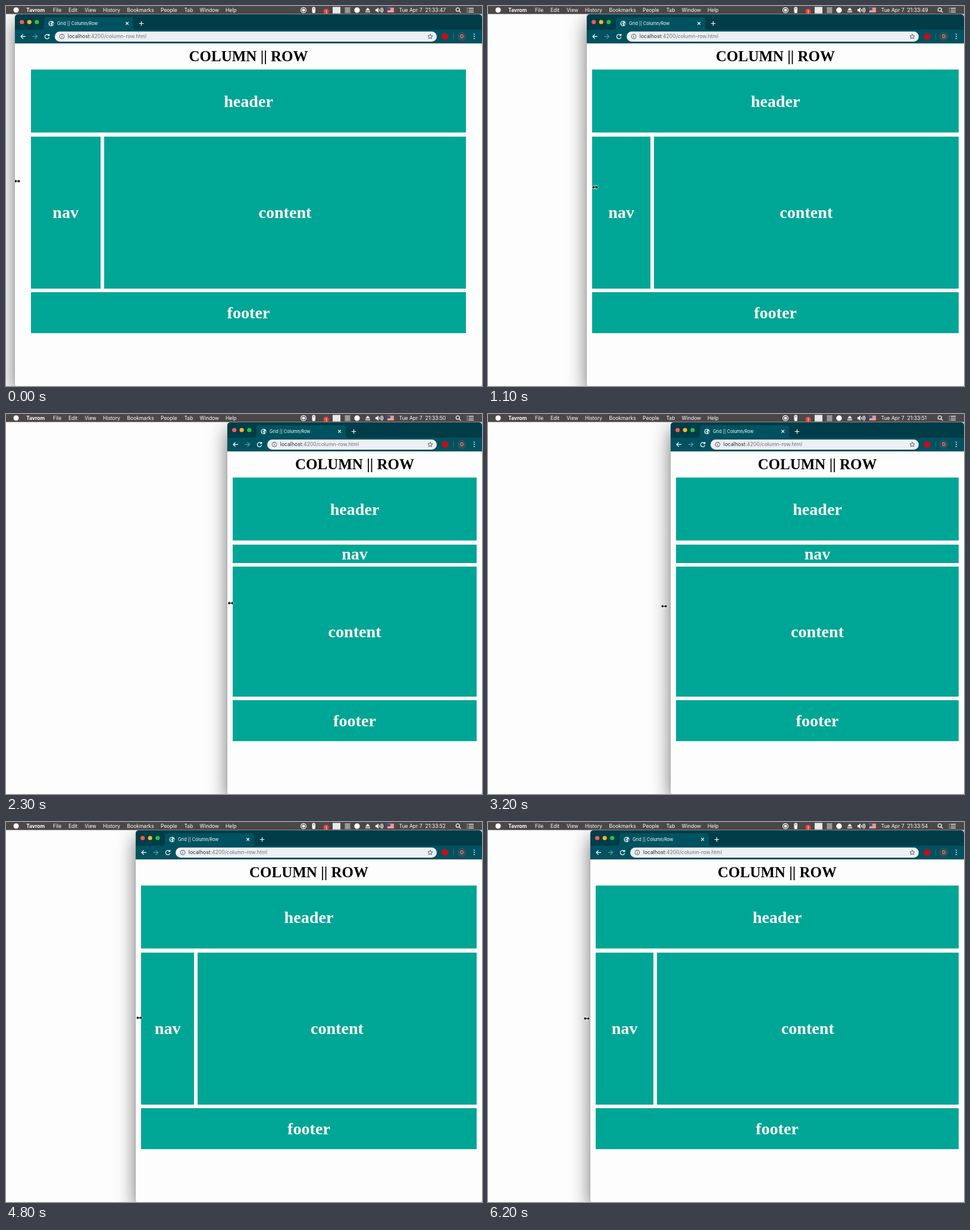
Animation, 800 px wide and 640 px high, one loop 6.3 s. Source, as an HTML page:

```html
<!DOCTYPE html>
<html lang="en">
<head>
<meta charset="utf-8">
<title>Column || Row</title>
<style>
  html, body { margin: 0; width: 800px; height: 640px; overflow: hidden; background: #fefdfe; }
  body { position: relative; }
  #win {
    position: absolute; top: 14px; right: 0; height: 626px; border-radius: 5px 5px 3px 3px; overflow: hidden;
    background: linear-gradient(#003d48 26px, #005260 26px 49px, #fefdfe 49px);
    box-shadow: 0 0 1px rgba(0,0,0,.5), 0 12px 32px rgba(0,0,0,.56);
  }
  #pill { position: absolute; left: 67px; right: 76px; top: 28.5px; height: 17.5px; border-radius: 9px; background: #edf0f5; }
  h1, #grid { font-family: "Liberation Serif", Times, serif; font-weight: bold; text-align: center; }
  h1 { position: absolute; top: 57px; width: 100%; margin: 0; font-size: 25px; line-height: 27px; color: #000; white-space: nowrap; }
  #grid {
    position: absolute; top: 93px; left: 9.375px; right: 9.375px; max-width: 731.25px; margin: auto;
    display: grid; gap: 6.25px; grid-template-columns: repeat(6, minmax(0, 1fr));
    grid-template-rows: 106.25px 31.25px 218.75px 68.75px; font-size: 28.125px; color: #fff;
  }
  #grid div { grid-column: 1 / 7; display: flex; align-items: center; justify-content: center; background: #00a695; line-height: 31px; }
  #grid.wide .nav { grid-area: 2 / 1 / 4 / 2; }
  #grid.wide .content { grid-area: 2 / 2 / 4 / 7; }
  svg { position: absolute; left: 0; top: 0; font-family: Inter, sans-serif; }
  text { white-space: pre; }
  .line { fill: none; stroke: #fff; stroke-width: 1.2; }
</style>
</head>
<body>
<div id="win">
  <div id="pill"></div>
  <h1>COLUMN || ROW</h1>
  <div id="grid">
    <div>header</div>
    <div class="nav">nav</div>
    <div class="content">content</div>
    <div>footer</div>
  </div>
</div>

<svg width="800" height="640" fill="#fff">
  <!-- tab and left side of the toolbar -->
  <g id="left">
    <circle cx="11.7" cy="27" r="3.6" fill="#ff5c54"/>
    <circle cx="24.2" cy="27" r="3.6" fill="#f9b42d"/>
    <circle cx="36.8" cy="27" r="3.6" fill="#27c53d"/>
    <path fill="#005260" d="M45 40q4 0 4-4V23q0-4 4-4H195q4 0 4 4V36q0 4 4 4z"/>
    <circle cx="61" cy="29.5" r="4.6" fill="#dcebed"/>
    <path fill="#2b6d78" d="M57.5 27.5l3-1.5 1.5 2-2.5 1.5 2 1.5-1 2.5-2-2zM62.5 29.5l2.5-1v2.500l-1.500 1.500z"/>
    <text x="71" y="32.200" font-size="7.4">Grid || Column/Row</text>
    <path class="line" stroke-width="1" d="M186.300 27l4.600 4.600m0-4.600l-4.600 4.600"/>
    <path class="line" d="M208.700 29.500h7.600m-3.800-3.800v7.600"/>
    <path class="line" d="M18 51.300h-8m3.700-3.700l-3.700 3.700 3.700 3.700"/>
    <path class="line" opacity=".4" d="M29.500 51.300h8m-3.700-3.700l3.700 3.700-3.700 3.700"/>
    <path class="line" d="M56.800 49a3.700 3.700 0 1 0 .9 3.400M57.600 47v2.800h-2.800"/>
    <g stroke="#50545a" fill="none"><circle cx="79" cy="51.300" r="3.900" stroke-width=".9"/><path d="M79 50.700v2.600M79 48.700v1.100"/></g>
    <text x="88.800" y="54.300" font-size="8.6" fill="#6b6e73"><tspan fill="#26282c">localhost</tspan>:4200/column-row.html</text>
  </g>

  <!-- right side of the toolbar -->
  <path fill="none" stroke="#4d5157" stroke-width=".9" d="M713 47.200l1.200 2.700 2.900.3-2.200 1.900.7 2.900-2.600-1.500-2.600 1.500.7-2.900-2.200-1.900 2.900-.3z"/>
  <circle cx="738" cy="51.300" r="5.600" fill="#c40d1c"/>
  <path fill="#27707c" d="M752 46h1v10h-1z"/>
  <circle cx="766" cy="51.300" r="7.200" fill="#424b53"/>
  <text x="766" y="54" font-size="7.500" text-anchor="middle" fill="#dde1e4">O</text>
  <g fill="#e4eef0"><circle cx="787" cy="47.600" r="1"/><circle cx="787" cy="51.200" r="1"/><circle cx="787" cy="54.800" r="1"/></g>

  <!-- menu bar -->
  <path fill="#4b4749" d="M0 0H800V13.500H0z"/>
  <circle cx="17" cy="6.700" r="4.500"/>
  <g id="menu" font-size="8.500"><text x="34" y="10" font-weight="bold">Tavrom</text></g>
  <circle class="line" cx="500" cy="7" r="4.400"/><circle cx="500" cy="7" r="2.500"/>
  <rect x="514.500" y="1.500" width="5.400" height="10.500" rx="2.500"/><path stroke="#4b4749" d="M517.200 3v3"/>
  <circle cx="538" cy="9" r="4.500" fill="#e8473f"/>
  <text x="538" y="11.500" font-size="6.500" text-anchor="middle">1</text>
  <rect x="549" y="1.500" width="13" height="11" fill="#e9e8e9"/>
  <rect x="569.500" y="2" width="9" height="10" fill="#9a9799"/>
  <circle cx="590" cy="7" r="4.700"/>
  <path d="M608 2.800l4 4.700h-8zM604 9h8v1.500h-8z"/>
  <path d="M621 5.200h2l3-2.700v9l-3-2.700h-2z"/>
  <path class="line" stroke-width=".9" d="M627.800 5q1.600 2 0 4M629.800 3.700q2.800 3.300 0 6.600M631.700 2.600q4 4.400 0 8.800"/>
  <rect x="641" y="2.700" width="11" height="8.300" fill="#f0d9da"/>
  <path stroke="#cf4a50" d="M641 3.200h11M641 5.500h11M641 7.800h11M641 10.200h11"/>
  <rect x="641" y="2.700" width="5" height="4.400" fill="#46568f"/>
  <text id="clock" x="660.500" y="10" font-size="8.600"></text>
  <circle class="line" cx="759.200" cy="6" r="2.900"/><path class="line" d="M761.400 8.200l3 3"/>
  <path class="line" d="M777.500 3.800h8.500M777.500 7h8.500M777.500 10.200h8.500M774.700 3.800h1.300M774.700 7h1.300M774.700 10.200h1.300"/>

  <path id="cursor" fill="#000" stroke="#fff" stroke-width="1.200" paint-order="stroke" d="M-5 0l3-2.800v2h4v-2l3 2.800-3 2.800v-2h-4v2z"/>
</svg>

<script>
const LOOP = 6300, STEP = 100;
const $ = id => document.getElementById(id);

// [time, left edge of the window]
const edge = [[0, 15], [700, 90], [1100, 166], [1400, 245], [2100, 357], [2300, 372], [2500, 376], [2800, 357],
  [3200, 307], [3500, 268], [3600, 270], [4000, 330], [4100, 322], [4700, 216], [4800, 218], [4900, 235],
  [5200, 282], [5300, 284], [5600, 240], [6000, 190], [6200, 172]];
// [time, pointer x relative to the edge, pointer y]
const pointer = [[0, 4, 295], [1100, 14, 305.3], [2300, 5.7, 318.5], [3200, -11, 323.7], [3700, 12, 325],
  [4100, -4, 326], [4400, -10, 328], [4800, 6, 329.8], [5100, 10, 330], [5500, -8, 330.5], [6200, -6, 331]];

// Monotone cubic interpolation through one column of a key list
function curve(keys, t, col = 1) {
  const slope = i => keys[i + 1] && keys[i]
    ? (keys[i + 1][col] - keys[i][col]) / (keys[i + 1][0] - keys[i][0]) : null;
  const tangent = i => {
    const a = slope(i - 1) ?? slope(i), b = slope(i) ?? a;
    return a * b > 0 ? 2 * a * b / (a + b) : 0;
  };
  let i = 0;
  while (i < keys.length - 2 && t >= keys[i + 1][0]) i++;
  const [p, q] = [keys[i], keys[i + 1]], span = q[0] - p[0], u = (t - p[0]) / span, v = 1 - u;
  return v * v * (1 + 2 * u) * p[col] + u * u * (3 - 2 * u) * q[col]
    + span * u * v * (v * tangent(i) - u * tangent(i + 1));
}

const items = { File: 79, Edit: 105, View: 132, History: 163, Bookmarks: 203.5, People: 260, Tab: 299.5, Window: 325.5, Help: 369 };
for (const [name, x] of Object.entries(items))
  $('menu').insertAdjacentHTML('beforeend', `<text x="${x}" y="10">${name}</text>`);

function draw(now) {
  const t = Math.floor(now % LOOP / STEP) * STEP;
  const x = Math.round(curve(edge, t));
  $('win').style.width = 800 - x + 'px';
  $('grid').classList.toggle('wide', 800 - x >= 500);
  $('left').setAttribute('transform', `translate(${x})`);
  $('cursor').setAttribute('transform', `translate(${x + curve(pointer, t)} ${curve(pointer, t, 2)})`);
  $('clock').textContent = `Tue Apr 7  21:33:${47 + Math.floor((t + 900) / 1000)}`;
  requestAnimationFrame(() => draw(performance.now() - start));
}
const start = performance.now();
draw(0);
</script>
</body>
</html>
```
